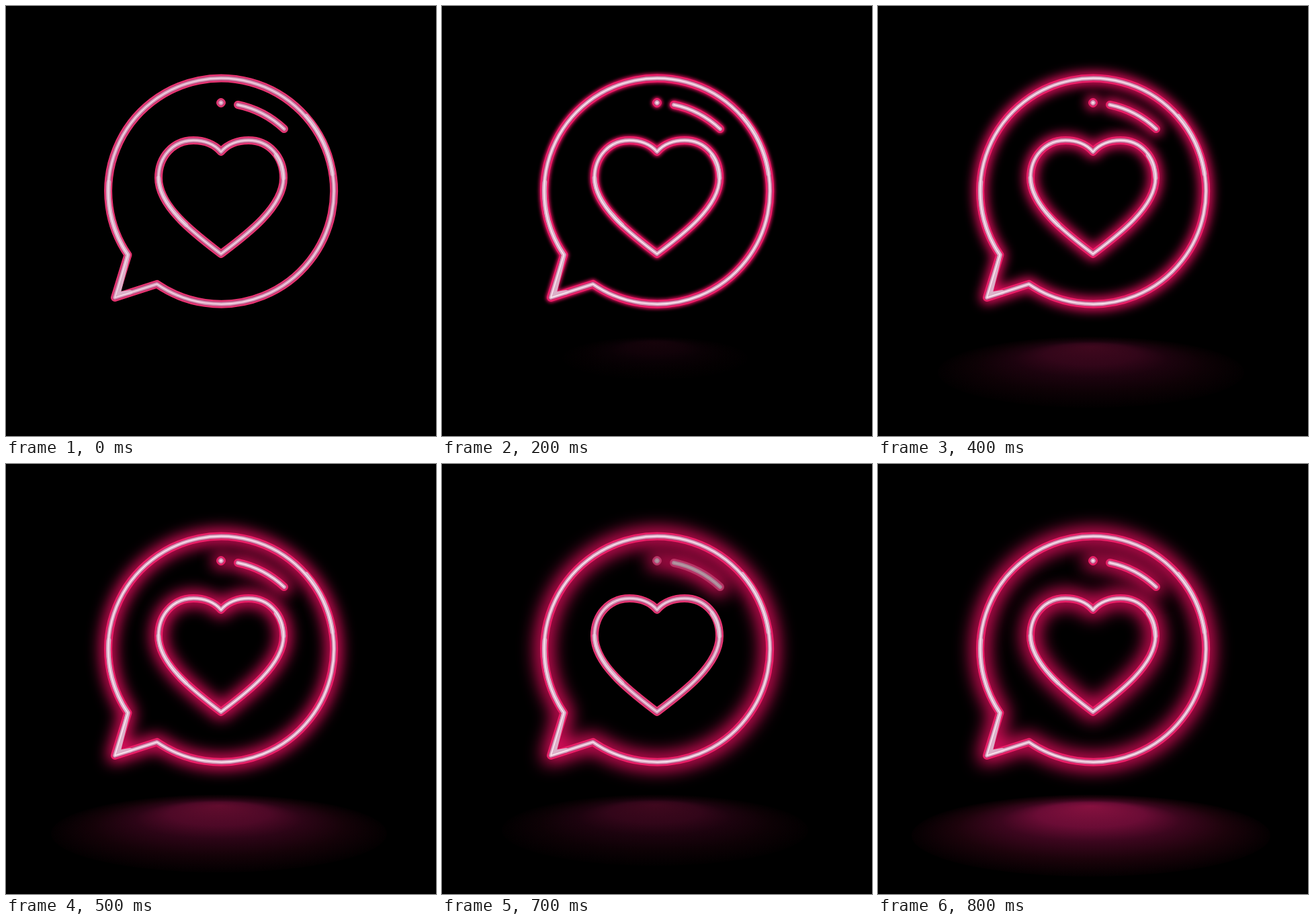
An HTML page for the animation above (1100 ms loop, 640 by 640 pixels).

```html
<!DOCTYPE html>
<html lang="en">
<head>
<meta charset="utf-8">
<title>Neon heart bubble</title>
<style>
html, body { margin: 0; height: 100%; overflow: hidden; background: #000; }
svg { display: block; width: 100vw; height: 100vh; }
path { fill: none; stroke-linecap: round; stroke-linejoin: round; }
</style>
</head>
<body>
<svg id="stage" viewBox="0 0 640 640">
  <defs>
    <radialGradient id="pool" cx=".5" cy=".5" r=".5" fx=".5" fy=".14">
      <stop offset="0" stop-color="#86113f"/>
      <stop offset=".3" stop-color="#6a0c35"/>
      <stop offset=".5" stop-color="#3c061e"/>
      <stop offset=".75" stop-color="#1c030b"/>
      <stop offset="1" stop-color="#040001"/>
    </radialGradient>
  </defs>
  <ellipse id="floor" cx="317" fill="url(#pool)"/>
  <g id="glows"></g>
  <g id="tubes"></g>
</svg>
<script>
const LOOP = 1100;
const $ = id => document.getElementById(id);

function add(parent, name, attrs) {
  const el = document.createElementNS('http://www.w3.org/2000/svg', name);
  set(el, attrs);
  return parent.appendChild(el);
}

function set(el, attrs) {
  for (const key in attrs) el.setAttribute(key, attrs[key]);
}

// Each tube has an outline and an optional path where its light core is thicker.
const shapes = {
  bubble: {
    d: 'M181.4 370.4A168 168 0 1 1 224.7 413.9L162 434Z',
    thick: 'M153 262A168 168 0 0 0 181.4 370.4L167 429L185 426M447 164A168 168 0 0 1 486 250'
  },
  heart: {
    d: 'M320 217C310 205 294 200 279 200C249 200 227 224 227 256C227 300 285 342 320 369' +
       'C356 342 413 300 413 256C413 224 391 200 361 200C346 200 330 205 320 217Z',
    thick: 'M227 256C228 283 248 307 268 326M402 222Q412 236 413 256'
  },
  shine: { d: 'M345 147Q384 155 414 183M319 144h2M320 143v2' }
};

function makeTube({ d, thick }) {
  const glow = add($('glows'), 'path', { d, stroke: '#e80e60' });
  const tube = add($('tubes'), 'g', {});
  const line = (d, stroke, width) =>
    add(tube, 'path', { d, stroke, 'stroke-width': width });
  const edge = line(d, '', 12);
  line(d, '#b53c72', 7.5);
  const core = line(d, '', 5.5);
  if (thick) line(thick, '#dcb0c8', 6.5);
  const shine = line(d, '#fbeef5', 1.4);
  return { glow, edge, core, shine };
}

const tubes = {};
for (const name in shapes) tubes[name] = makeTube(shapes[name]);

function lightTube({ glow, edge, core, shine }, level, dim) {
  const blur = 2.6 * level;
  set(glow, { 'stroke-width': 12 + blur, opacity: level ? 1 : 0 });
  glow.style.filter = level ? `blur(${blur}px)` : 'none';
  set(edge, { stroke: dim ? '#b83464' : level ? '#ee1f68' : '#e83572' });
  set(core, { stroke: dim ? '#a98795' : level ? '#dca4c0' : '#d799b8' });
  set(shine, { opacity: dim ? 0.2 : level ? 1 : 0.8 });
}

// Floor reflection per level: radius x, radius y, opacity.
const pools = [
  [0, 0, 0], [138, 32, 0.16], [190, 44, 0.3],
  [228, 53, 0.47], [250, 58, 0.73], [267, 61, 1]
];

function draw(t) {
  const flicker = t >= 700 && t < 800;
  const level = t < 200 ? 0 : Math.min(5, Math.floor(t / 100) - 1);

  lightTube(tubes.bubble, level);
  lightTube(tubes.heart, flicker ? 0 : level);
  lightTube(tubes.shine, level, flicker);

  const [rx, ry, opacity] = pools[flicker ? 3 : level];
  set($('floor'), { rx, ry, cy: 492 + ry, opacity });
}

const start = performance.now();
function tick() {
  draw((performance.now() - start) % LOOP);
  requestAnimationFrame(tick);
}
tick();
</script>
</body>
</html>
```
